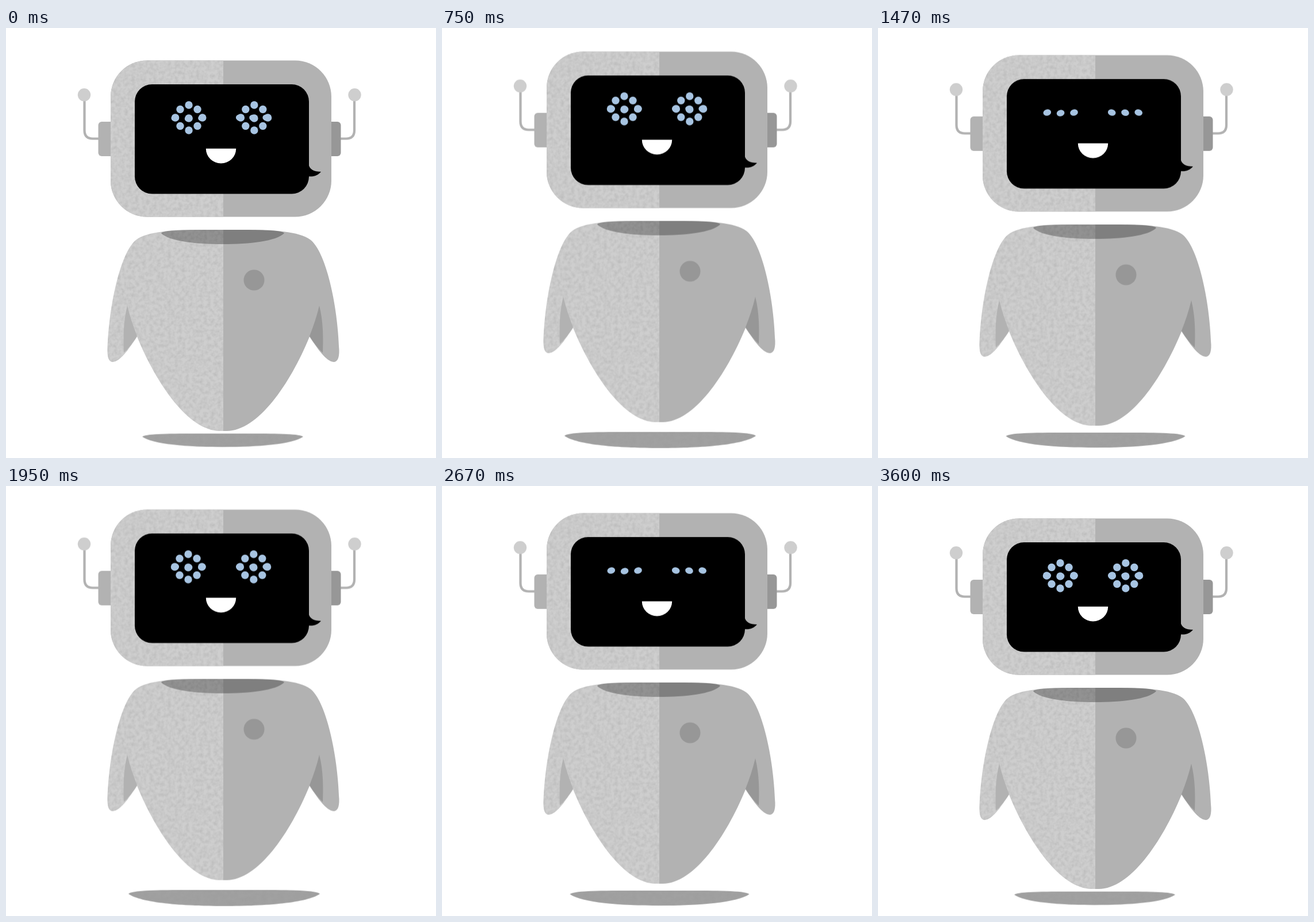
These frames come from a looping animation (748x748 px, 3630 ms). An HTML page:

```html
<!DOCTYPE html>
<html lang="en">
<head>
<meta charset="utf-8">
<title>Floating robot</title>
<style>
  html, body { margin: 0; width: 100%; height: 100%; overflow: hidden; background: #fff; }
  svg { display: block; width: 748px; height: 748px; }

  .bob, .ground, .open { animation: 3630ms -3ms infinite; }
  .bob { animation-name: bob; animation-timing-function: steps(20); }
  .ground { animation-name: spread; animation-timing-function: steps(20); transform-origin: 364px 719.5px; }
  .open { animation-name: blink; animation-timing-function: step-end; }

  /* three 1200 ms bobs, then one 30 ms hold */
  @keyframes bob {
    0%, 33.058%, 66.116%, 99.174%, 100% { transform: translateY(0); }
    16.529%, 49.587%, 82.645% { transform: translateY(-20.5px); }
  }
  @keyframes spread {
    0%, 33.058%, 66.116%, 99.174%, 100% { transform: scale(1); }
    16.529%, 49.587%, 82.645% { transform: scale(1.2525); }
  }
  @keyframes blink {
    0% { opacity: 1; transform: translateX(1px); }
    7.438%, 40.496%, 73.554% { opacity: 0; transform: none; }
    20.661%, 53.719%, 86.777%, 100% { opacity: 1; transform: none; }
  }

  .light { fill: #cecece; }
  .mid { fill: #b2b2b2; }
  .dark { fill: #979797; }
  .wire { fill: none; stroke: #b2b2b2; stroke-width: 4.2; }
  .eyes { fill: #a7c4e2; }
</style>
</head>
<body>
<svg viewBox="0 0 748 748" xmlns="http://www.w3.org/2000/svg">
  <defs>
    <filter id="grain" x="0" y="0" width="1" height="1" color-interpolation-filters="sRGB">
      <feTurbulence type="fractalNoise" baseFrequency=".16" numOctaves="2" seed="4"/>
      <feColorMatrix values="0 0 0 0 .6  0 0 0 0 .6  0 0 0 0 .6  .6 0 0 0 -.22"/>
      <feComposite in2="SourceAlpha" operator="in" result="noise"/>
      <feMerge><feMergeNode in="SourceGraphic"/><feMergeNode in="noise"/></feMerge>
    </filter>
    <clipPath id="left"><rect width="378" height="748"/></clipPath>

    <rect id="head" x="182" y="56.5" width="384" height="272" rx="63"/>
    <path id="half" d="M378.3 351H345C290 351 246 354 227 368C200 388 179 480 176.5 560C176 575 180 581 186 581C199 580 214 558 228 537C262 620 318 701 372 701H378.3Z"/>
    <path id="slit" d="M211 483C204 510 204 540 205 565Q216 555 228 536C221 518 215 500 211 483Z"/>
    <path id="disc" d="M270 357C274 350 320 351 377 351S480 350 484 357C470 371 424 376 377 376S284 371 270 357Z"/>
    <g id="antenna">
      <path class="wire" d="M136.5 124V178Q136.5 192.5 151 192.5H161"/>
      <circle class="light" cx="136" cy="116.3" r="11.2"/>
    </g>
    <g id="eye">
      <circle r="6.8" cy="1"/>
      <circle r="6.8" cx="-23.5"/><circle r="6.8" cx="23.7"/>
      <circle r="6.7" cy="-22"/><circle r="6.7" cy="22"/>
      <circle r="6.7" cx="-15" cy="-14.5"/><circle r="6.7" cx="15" cy="-14.5"/>
      <circle r="6.7" cx="-15" cy="14.5"/><circle r="6.7" cx="15" cy="14.5"/>
    </g>
    <ellipse id="lid" rx="6.9" ry="5.5"/>
  </defs>

  <g class="ground">
    <use href="#disc" fill="#a1a1a1" filter="url(#grain)" transform="matrix(1.308 0 0 .94 -116.1 375.5)"/>
  </g>

  <g class="bob">
    <use href="#antenna"/>
    <use href="#antenna" transform="matrix(-1 0 0 1 742.5 0)"/>
    <rect class="mid" x="160.5" y="163" width="40" height="60" rx="6"/>
    <rect class="dark" x="542" y="163" width="40.5" height="60" rx="6"/>

    <use href="#head" class="mid"/>
    <g clip-path="url(#left)"><use href="#head" class="light" filter="url(#grain)"/></g>
    <rect x="224" y="98" width="303" height="190.5" rx="30"/>
    <path d="M526 236C528 246 535 250 548 250C542 257 535 259 526 258Z"/>
    <path fill="#fff" d="M347.8 209.8H400.2A26.2 25.7 0 0 1 347.8 209.8Z"/>

    <g class="eyes">
      <use href="#lid" transform="translate(294.3 156.2) rotate(-15)"/>
      <use href="#lid" transform="translate(317.6 157.2) rotate(-15)"/>
      <use href="#lid" transform="translate(341 156.2) rotate(-15)"/>
      <use href="#lid" transform="translate(406.7 156.2) rotate(15)"/>
      <use href="#lid" transform="translate(430 156.4) rotate(15)"/>
      <use href="#lid" transform="translate(453.2 156.2) rotate(15)"/>
      <g class="open">
        <use href="#eye" x="317" y="156"/>
        <use href="#eye" x="430.8" y="156"/>
      </g>
    </g>

    <use href="#half" class="mid" transform="matrix(-1 0 0 1 756 0)"/>
    <use href="#slit" class="dark" transform="matrix(-1 0 0 1 756 0)"/>
    <g clip-path="url(#left)"><use href="#half" class="light" filter="url(#grain)"/></g>
    <use href="#slit" class="mid"/>
    <use href="#disc" fill-opacity=".29"/>
    <circle class="dark" cx="431.5" cy="438.5" r="18"/>
  </g>
</svg>
</body>
</html>
```
